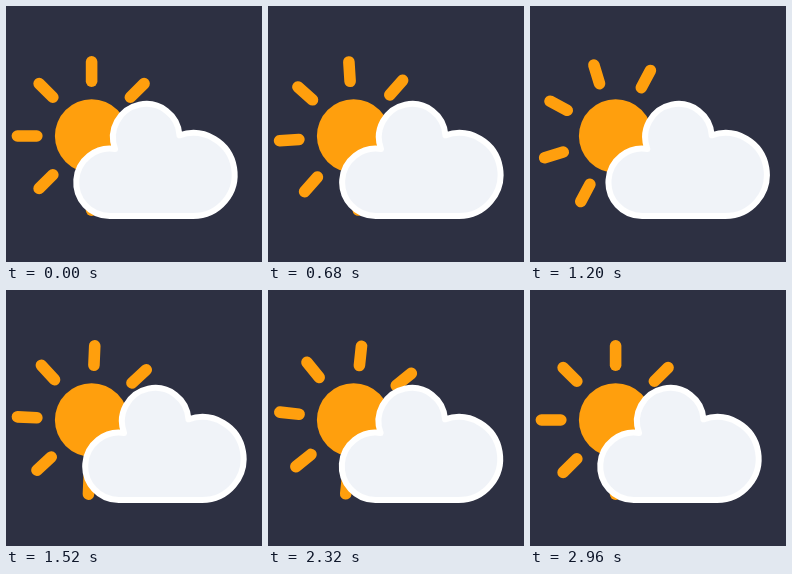
An HTML page that plays this animation: 256 by 256 pixels, repeating every 3 s.

```html
<!DOCTYPE html>
<html lang="en">
<head>
<meta charset="utf-8">
<title>Partly cloudy</title>
<style>
html, body { margin: 0; height: 100%; overflow: hidden; background: #2d3042; }
svg { display: block; width: 100vw; height: 100vh; }
</style>
</head>
<body>
<svg viewBox="0 0 256 256">
  <defs><path id="ray" d="M0-54.8V-74.2" stroke="#ff9f0d" stroke-width="11.6" stroke-linecap="round"/></defs>
  <g transform="translate(85.6 130)">
    <circle r="36.7" fill="#ff9f0d"/>
    <g id="rays"></g>
  </g>
  <path id="cloud" fill="#f0f3f8" stroke="#fff" stroke-width="6" stroke-linejoin="round"
    d="M103.8 210A33.7 33.7 0 1 1 109.1 143A33.3 33.3 0 1 1 173.5 129.3A41.5 41.5 0 1 1 187 210Z"/>
</svg>
<script>
const LOOP = 3000, STEP = 40, SPAN = LOOP - STEP;
const rays = document.getElementById('rays');
const cloud = document.getElementById('cloud');

for (let a = 0; a < 360; a += 45)
  rays.innerHTML += `<use href="#ray" transform="rotate(${a})"/>`;

// The last step of the loop shows the same pose as the first.
function draw() {
  const p = Math.floor(performance.now() % LOOP / STEP) * STEP / SPAN;
  const drift = 4.5 * (1 - Math.cos(2 * Math.PI * p));
  rays.setAttribute('transform', `rotate(${180 * p})`);
  cloud.setAttribute('transform', `translate(${drift} 0)`);
  requestAnimationFrame(draw);
}
draw();
</script>
</body>
</html>
```
